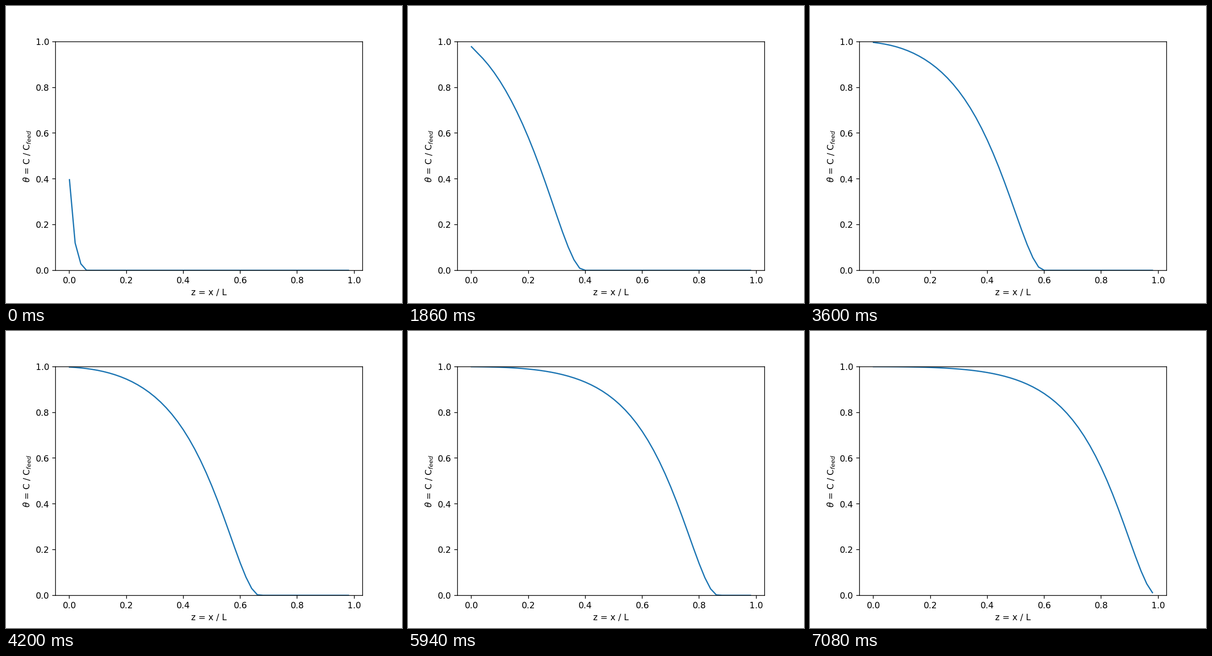
Write a matplotlib script that moves like this. It is 864 px wide and 648 px high and loops after 7140 ms.

```python
import numpy as np
import matplotlib.pyplot as plt
from matplotlib.animation import FuncAnimation

CELLS, STEPS = 50, 119
Z = np.arange(CELLS) / CELLS


def front(step):
    """Leading edge: quick entry that settles to a steady speed."""
    return .198 + .0068 * step - .137 / (1 + step / 3.6)


def theta(step):
    """Concentration along the bed: travelling wave plus inlet saturation."""
    s = np.maximum(front(step) - Z, 0)
    inlet = 2 * np.exp(-5.5 * Z ** .72) * (2 * s) ** (.6 + 2.4 * np.sqrt(Z))
    return (1 - np.exp(-7 * s - inlet)) ** 2


fig, ax = plt.subplots(figsize=(6.4, 4.8), dpi=135)
line, = ax.plot(Z, theta(0))
ax.set_ylim(0, 1)
ax.set_xlabel("z = x / L")
ax.set_ylabel(r"$\theta$ = C / C$_{feed}$")


def update(step):
    line.set_ydata(theta(step))
    return line,


anim = FuncAnimation(fig, update, frames=STEPS, interval=60,
                     repeat=True, repeat_delay=0)
plt.show()
```
